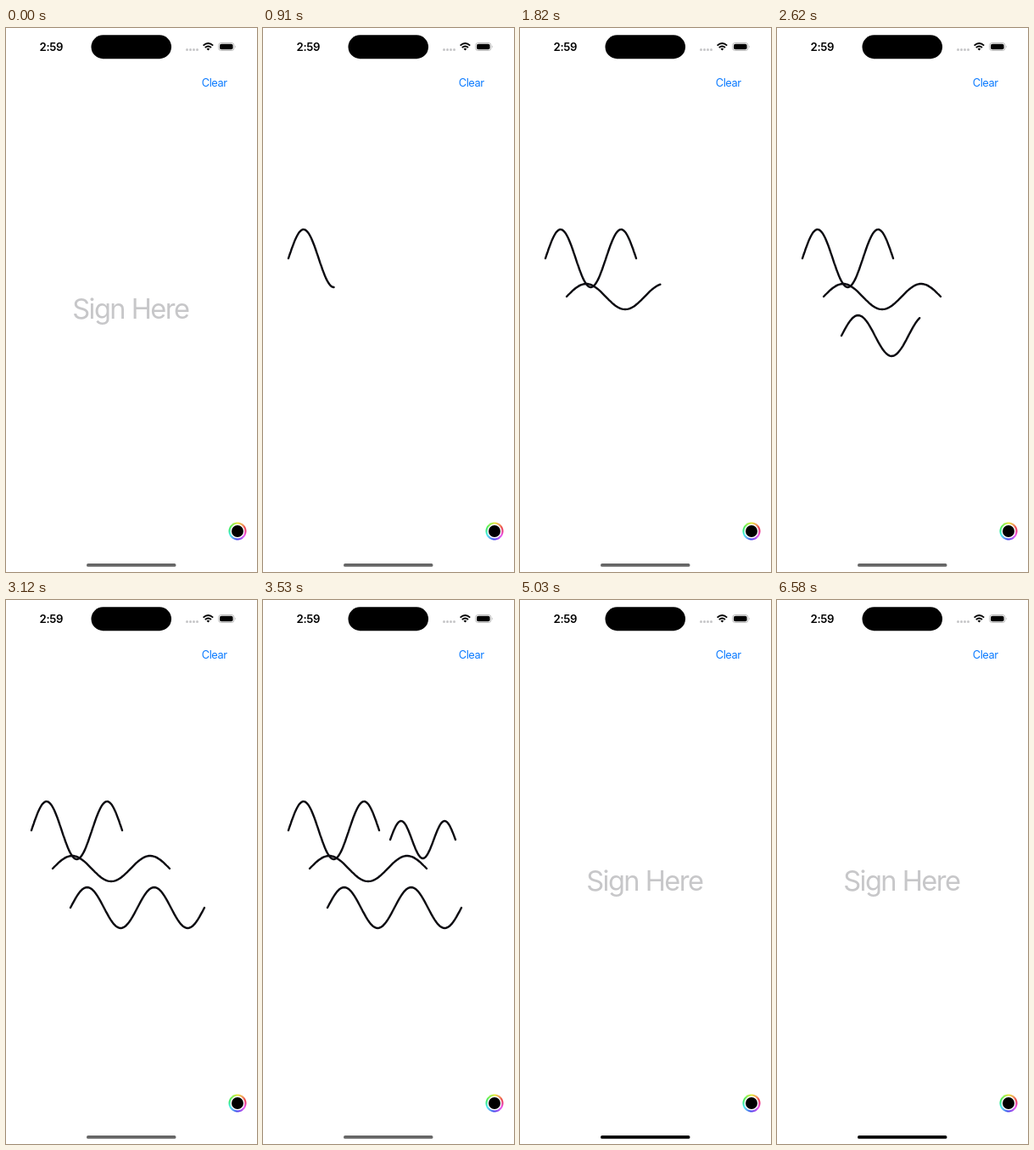
Write an HTML page that moves like this. It is 296 px wide and 640 px high and loops after 8000 ms.

```html
<!DOCTYPE html>
<html lang="en">
<head>
<meta charset="utf-8">
<title>Sign Here</title>
<style>
  html, body { margin: 0; width: 100%; height: 100%; overflow: hidden; background: #fff; }
  svg { display: block; width: 100vw; height: 100vh; }
  text { font-family: Inter, sans-serif; }
  #ink path { fill: none; stroke: #0b0a10; stroke-width: 2.4; stroke-linecap: round; stroke-linejoin: round; }
</style>
</head>
<body>
<svg viewBox="0 0 296 640">
  <rect width="296" height="640" fill="#fff"/>

  <!-- status bar -->
  <text x="39.6" y="26.8" font-size="13.2" font-weight="600" letter-spacing="-.35">2:59</text>
  <rect x="100.5" y="8.3" width="94.5" height="27.9" rx="13.95"/>
  <g fill="#c6c6c8">
    <circle cx="213.5" cy="25.4" r="1.5"/><circle cx="217.5" cy="25.4" r="1.5"/>
    <circle cx="221.5" cy="25.4" r="1.5"/><circle cx="225.5" cy="25.4" r="1.5"/>
  </g>
  <g fill="none" stroke="#000" stroke-width="1.9">
    <path d="M232.6 20.6Q238.4 15.4 244.2 20.6"/>
    <path d="M234.8 23Q238.4 19.8 242 23"/>
  </g>
  <path d="M236.5 24.6Q238.4 23 240.3 24.6L238.4 26.6Z"/>
  <rect x="250.6" y="17.5" width="18.4" height="9" rx="3" fill="none" stroke="#aaa" stroke-width=".8"/>
  <rect x="252" y="18.8" width="15.6" height="6.4" rx="1.9"/>
  <path d="M270 20.4Q271.4 22 270 23.6Z" fill="#aaa"/>

  <text id="clear" x="230.7" y="68.8" font-size="12.8" letter-spacing="-.4" fill="#0a7aff">Clear</text>
  <text id="hint" x="146.8" y="341.5" font-size="32.6" letter-spacing="-1.55" text-anchor="middle" fill="#c7c7c9">Sign Here</text>
  <g id="ink"></g>

  <!-- colour well -->
  <g id="ring" fill="none" stroke-width="2.1"></g>
  <circle cx="273" cy="592" r="7"/>

  <rect id="home" x="95" y="630" width="105.5" height="3.8" rx="1.9"/>
</svg>
<script>
const LOOP = 8000, CLEAR = 4570;
const $ = id => document.getElementById(id);
const add = (parent, attrs) => {
  const el = document.createElementNS('http://www.w3.org/2000/svg', 'path');
  for (const k in attrs) el.setAttribute(k, attrs[k]);
  return parent.appendChild(el);
};

// Hue runs backwards, clockwise from yellow at the top.
const rim = a => {
  const r = a * Math.PI / 180;
  return `${273 + 9.5 * Math.sin(r)} ${592 - 9.5 * Math.cos(r)}`;
};
for (let a = 0; a < 360; a += 6) {
  add($('ring'), { d: `M${rim(a)}L${rim(a + 6.6)}`, stroke: `hsl(${(420 - a) % 360} 82% 59%)` });
}

// Abstract pen waves: x range, middle height, swing, half turns, and bursts [start, end, steps].
const waves = [
  { x: [30, 137], y: 271, swing: 34, turns: 3, bursts: [[500, 740, 3], [910, 1350, 5]] },
  { x: [55, 193], y: 316, swing: 15, turns: 3, bursts: [[1490, 1910, 5]] },
  { x: [76, 234], y: 362, swing: 24, turns: 4, bursts: [[2010, 2220, 3], [2320, 3120, 9]] },
  { x: [150, 227], y: 282, swing: 22, turns: 3, bursts: [[3220, 3530, 4]] }
];
for (const w of waves) {
  w.el = add($('ink'), {});
  w.total = w.bursts.reduce((n, b) => n + b[2], 0);
}

function progress(w, t) {
  let done = 0;
  for (const [from, to, steps] of w.bursts) {
    if (t < from) break;
    done += Math.min(steps, 1 + Math.floor((t - from) / (to - from) * (steps - 1) + 1e-6));
  }
  return done / w.total;
}

function wavePath(w, end) {
  if (!end) return '';
  const n = Math.ceil(end * 80);
  let d = '';
  for (let i = 0; i <= n; i++) {
    const u = end * i / n;
    const x = w.x[0] + (w.x[1] - w.x[0]) * u;
    const y = w.y - w.swing * Math.sin(Math.PI * w.turns * u);
    d += `${i ? 'L' : 'M'}${x.toFixed(1)} ${y.toFixed(1)}`;
  }
  return d;
}

function draw(t) {
  const inked = t >= 500 && t < CLEAR;
  for (const w of waves) w.el.setAttribute('d', inked ? wavePath(w, progress(w, t)) : '');
  $('hint').setAttribute('visibility', inked ? 'hidden' : 'visible');
  const since = t - CLEAR;
  const step = Math.floor(since / 115);
  const fade = since < 0 ? 1 : Math.min(1, .2 + step * .2);
  $('clear').setAttribute('opacity', fade);
  const grey = since < 0 ? 102 : Math.round(102 * Math.max(0, 1 - (step + 1) / 5));
  $('home').setAttribute('fill', `rgb(${grey},${grey},${grey})`);
}

const start = performance.now();
function tick() {
  draw((performance.now() - start) % LOOP);
  requestAnimationFrame(tick);
}
tick();
</script>
</body>
</html>
```
